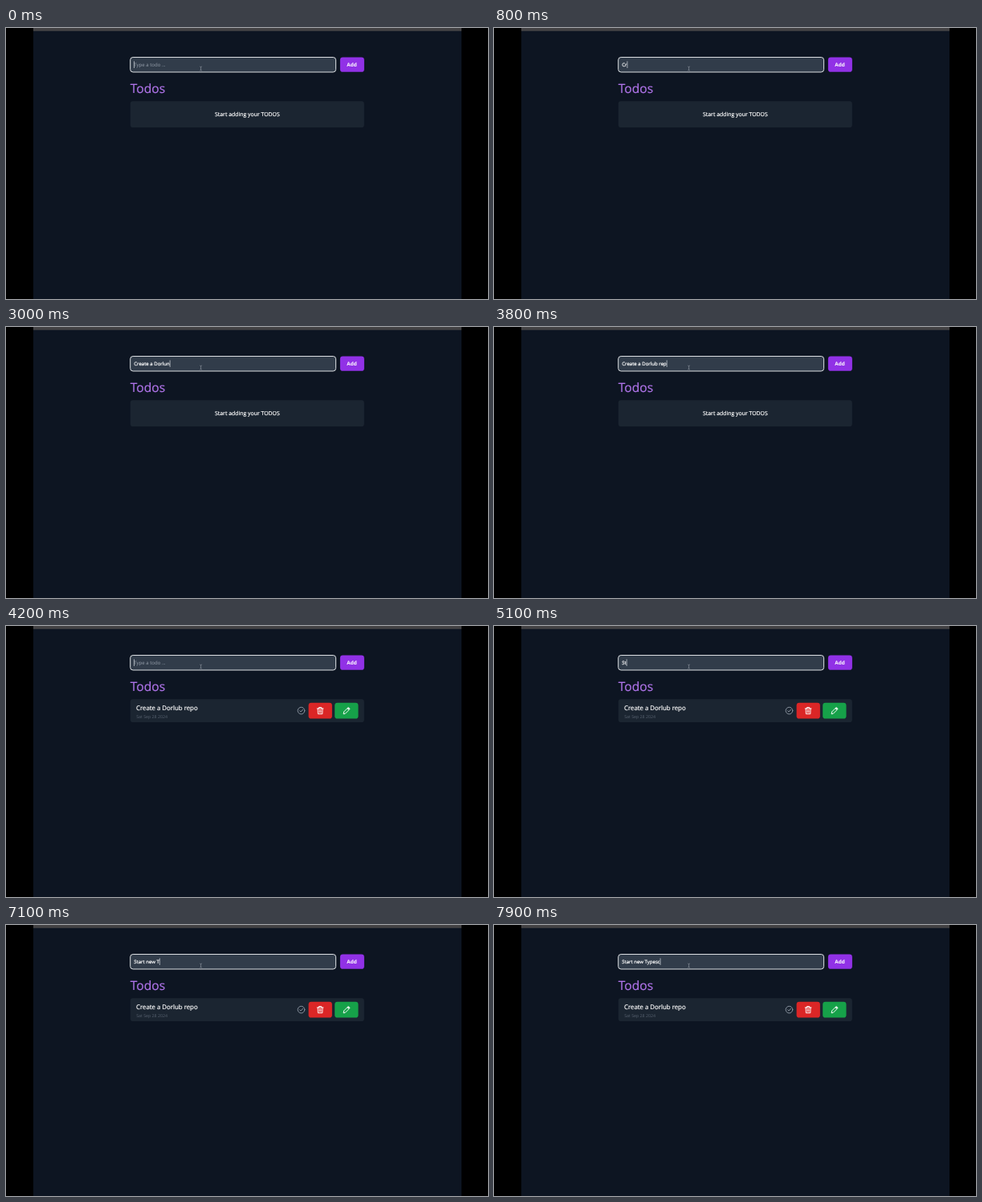
Write an HTML page that moves like this. It is 600 px wide and 338 px high and loops after 8000 ms.

```html
<!DOCTYPE html>
<html lang="en">
<head>
<meta charset="utf-8">
<title>Todos</title>
<style>
  html, body { margin: 0; width: 100%; height: 100%; overflow: hidden; background: #000; }
  svg { display: block; width: 100%; height: 100%; }
  text {
    font-family: "Open Sans", "Noto Sans", sans-serif;
    fill: #fff;
    white-space: pre;
    text-rendering: geometricPrecision;
  }
  .field { font-size: 6.05px; }
  .strong { stroke: #fff; stroke-width: .2; }
  .icon { fill: none; stroke: #fff; stroke-width: .95; stroke-linecap: round; stroke-linejoin: round; }
</style>
</head>
<body>
<svg viewBox="0 0 600 338">
  <rect x="34" width="533" height="338" fill="#0d1522"/>
  <rect x="34" width="533" height="3.8" fill="#434244"/>

  <rect x="154.7" y="36.5" width="255.9" height="18.5" rx="3.4" fill="#313c4a" stroke="#e6e9ed" stroke-width=".95"/>
  <text id="hint" class="field" x="159.3" y="48.2" style="fill:#98a1ad">Type a todo ...</text>
  <text id="typed" class="field strong" x="159.3" y="48.2" xml:space="preserve"></text>
  <rect id="caret" y="41.4" width=".7" height="8.6" fill="#d3d8de"/>
  <path d="M241.3 48.2h.7l.6.5.6-.5h.7M242.6 48.7v3.8M241.3 53h.7l.6-.5.6.5h.7" fill="none" stroke="#9aa2ac" stroke-width=".6"/>

  <rect x="415.9" y="36.5" width="30" height="18.3" rx="3.4" fill="#9131e6"/>
  <text x="430.6" y="48.3" text-anchor="middle" font-size="6.4" font-weight="700">Add</text>

  <text x="154.8" y="81.2" font-size="15.6" style="fill:#b074ea;stroke:#b074ea;stroke-width:.2">Todos</text>

  <g id="empty">
    <rect x="154.8" y="91.3" width="291" height="32.8" rx="3.4" fill="#1b2531"/>
    <text class="strong" x="300.4" y="110.3" text-anchor="middle" font-size="6.92">Start adding your TODOS</text>
  </g>

  <g id="item">
    <rect x="154.8" y="91.3" width="291" height="28.8" rx="3.4" fill="#1b2531"/>
    <text class="strong" x="162" y="104.5" font-size="7.85">Create a Dorlub repo</text>
    <text x="162.2" y="115" font-size="5.25" style="fill:#586270">Sat Sep 28 2024</text>

    <g class="icon" style="stroke:#8d96a2">
      <circle cx="367.5" cy="105.6" r="4.3"/>
      <path d="M365.6 105.8l1.4 1.3 2.5-2.8"/>
    </g>

    <rect x="376.6" y="95.7" width="29.3" height="19.9" rx="3.4" fill="#db2626"/>
    <g class="icon">
      <path d="M387.3 103h7.6M389.5 103v-1.5h3.2v1.5M388.1 103l.3 6.7h5.4l.3-6.7M390.2 104.8v3.2M392 104.8v3.2"/>
    </g>

    <rect x="409.2" y="95.7" width="29.3" height="19.9" rx="3.4" fill="#16a149"/>
    <g class="icon">
      <path d="M420.2 109.4l.5-2.5 4.2-4.2 2 2-4.2 4.2z"/>
      <path d="M425.4 102.3l.8-.7 1.7 1.7-.8.8z" fill="#fff"/>
    </g>
  </g>
</svg>

<script>
  const LOOP = 8000;
  const BLINK = 500;
  const FIELD_X = 159.3;
  const FIRST_FOCUS = -200;
  const BACKSPACE = '\b';
  const ENTER = '\n';

  // Each run: the keys and the moment each one is pressed.
  const runs = [
    ['Create a ', [700, 800, 900, 1000, 1100, 1200, 1300, 1400, 1500]],
    ['Dorlun', [1900, 2100, 2300, 2500, 2700, 2900]],
    [BACKSPACE + 'b repo' + ENTER, [3200, 3300, 3400, 3500, 3700, 3800, 4000, 4100]],
    ['Start ', [4900, 5100, 5200, 5400, 5500, 5700]],
    ['new ', [6000, 6200, 6400, 6600]],
    ['Typesc', [6900, 7200, 7400, 7600, 7700, 7800]]
  ];
  const presses = runs.flatMap(([keys, times]) => [...keys].map((key, i) => ({ key, at: times[i] })));

  const $ = id => document.getElementById(id);
  const [hint, typed, caret, empty, item] = ['hint', 'typed', 'caret', 'empty', 'item'].map($);
  const show = (el, on) => { el.style.display = on ? '' : 'none'; };

  function stateAt(time) {
    let text = '', added = false, lastPress = FIRST_FOCUS;
    for (const { key, at } of presses) {
      if (at > time) break;
      lastPress = at;
      if (key === BACKSPACE) text = text.slice(0, -1);
      else if (key === ENTER) { text = ''; added = true; }
      else text += key;
    }
    return { text, added, caretOn: (time - lastPress) % (2 * BLINK) < BLINK };
  }

  function draw(time) {
    const { text, added, caretOn } = stateAt(time);
    typed.textContent = text;
    caret.setAttribute('x', FIELD_X + (text ? typed.getComputedTextLength() : 0));
    show(caret, caretOn);
    show(hint, !text);
    show(empty, !added);
    show(item, added);
  }

  const start = performance.now();
  function tick() {
    draw((performance.now() - start) % LOOP);
    requestAnimationFrame(tick);
  }
  tick();
</script>
</body>
</html>
```
